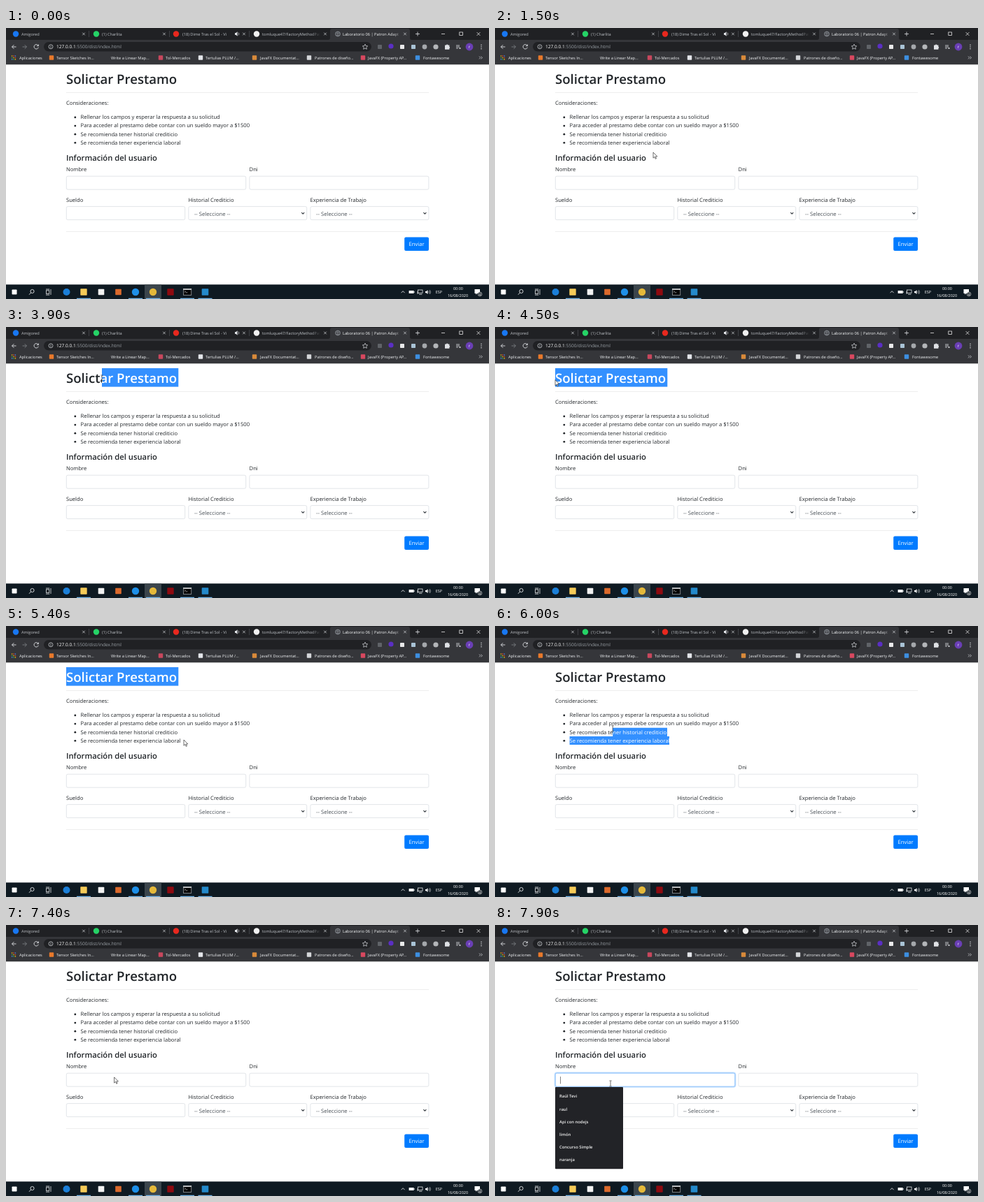
Recreate the animation shown at these times as an HTML page. Size 690 by 388 pixels, loop 8000 ms.

```html
<!DOCTYPE html>
<html lang="es">
<head>
<meta charset="utf-8">
<title>Solicitar préstamo</title>
<style>
  html, body { margin: 0; width: 100%; height: 100%; overflow: hidden; background: #fff; }
  svg { display: block; width: 690px; height: 388px; }
  text { font-family: "Open Sans", "Noto Sans", sans-serif; text-rendering: geometricPrecision; white-space: pre; }
</style>
</head>
<body>
<svg id="stage" viewBox="0 0 690 388" xmlns="http://www.w3.org/2000/svg"></svg>
<script>
const INK = '#212529', BLUE = '#3390ff', STRIP = '#202124', BAR = '#35363a', PALE = '#dfe1e5';

// Markup helpers
const rect = (x, y, w, h, fill, more = '') =>
  `<rect x="${x}" y="${y}" width="${w}" height="${h}" fill="${fill}" ${more}/>`;
const dot = (x, y, r, fill, more = '') => `<circle cx="${x}" cy="${y}" r="${r}" fill="${fill}" ${more}/>`;
const square = (x, y, size, fill) => rect(x - size / 2, y - size / 2, size, size, fill, 'rx=".8"');
const line = (d, color, width = 0.8, more = '') =>
  `<path d="${d}" fill="none" stroke="${color}" stroke-width="${width}" ${more}/>`;
const text = (x, y, size, fill, str, more = '') =>
  `<text x="${x}" y="${y}" font-size="${size}" fill="${fill}" ${more}>${str}</text>`;
const cross = (x, y, r, color) =>
  line(`M${x - r} ${y - r}l${2 * r} ${2 * r}m0 ${-2 * r}l${-2 * r} ${2 * r}`, color, 0.7);

const SEMI = 'font-weight="600"';
const MID = 'text-anchor="middle"';

function tabs() {
  const list = [
    { x: 14, tx: 22, color: '#1877f2', label: 'Amigored', close: 111 },
    { x: 129, tx: 137, color: '#25d366', label: '(1) Charlita', close: 226 },
    { x: 243, tx: 252, color: '#e8281e', label: '(18) Dime Tras el Sol - Vi', fade: 315, end: 326, close: 340 },
    { x: 358, tx: 366, color: '#f1f1f1', label: 'tomluque47/FactoryMethodPatt', fade: 436, end: 449, close: 456 },
    { x: 474, tx: 481, color: '#9aa0a6', label: 'Laboratorio 06 | Patron Adapt', fade: 553, end: 565, close: 570, on: true },
  ];
  let out = rect(0, 0, 690, 17, STRIP) +
    `<path d="M460 17q3 0 3-3V4q0-3 3-3h108q3 0 3 3v10q0 3 3 3z" fill="${BAR}"/>`;
  for (const t of list) {
    const bg = t.on ? 'fadeOn' : 'fadeOff';
    out += t.on
      ? dot(t.x, 8.5, 3.4, 'none', `stroke="${t.color}" stroke-width=".8"`) +
        line(`M${t.x - 3} 7.5h6m-6 2.5h6M${t.x} 5v7`, t.color, 0.6)
      : dot(t.x, 8.5, 4.2, t.color);
    out += text(t.tx, 10.7, 5.7, t.on ? '#f1f3f4' : '#bdc1c6', t.label);
    if (t.fade) {
      out += rect(t.fade, 3, t.end - t.fade, 11, `url(#${bg})`) +
        rect(t.end, 3, t.close - t.end - 3, 11, t.on ? BAR : STRIP);
    }
    out += cross(t.close, 8.5, 1.8, PALE);
  }
  for (const x of [118, 233, 347]) out += rect(x, 4, 0.6, 9, '#55585d');
  out += `<path d="M327 7h1.6l2-1.8v6.6l-2-1.8H327z" fill="${PALE}"/>` +
    line('M332 6.6q1.6 1.9 0 3.8', PALE, 0.7) +
    line('M585 8.5h6m-3-3v6', PALE) +
    line('M622 8.5h5', '#fff', 0.7) +
    rect(647.8, 6, 4.6, 4.6, 'none', 'stroke="#fff" stroke-width=".7"') +
    cross(675, 8.5, 2.4, '#fff');
  return out;
}

function toolbar() {
  let out = rect(0, 17, 690, 35.3, BAR) +
    line('M14.5 27h-6m2.8-2.8L8.5 27l2.8 2.8', PALE, 0.9) +
    line('M23.5 27h6m-2.8-2.8 2.8 2.8-2.8 2.8', '#7b7e83', 0.9) +
    line('M46 25.2a3.2 3.2 0 1 0 .3 2.6M46.4 23.5v2.2h-2.2', PALE, 0.9) +
    rect(54, 20, 468, 13.6, STRIP, 'rx="6.8"') +
    dot(64, 26.8, 3, 'none', `stroke="${PALE}" stroke-width=".7"`) +
    line('M64 26.2v2.3M64 24.9v.7', PALE, 0.7) +
    `<text x="72" y="29.2" font-size="6.55" fill="#9aa0a6"><tspan fill="#fff">127.0.0.1</tspan>:5500/dist/index.html</text>` +
    `<path d="M513 23.2l1.1 2.4 2.6.3-1.9 1.8.5 2.6-2.3-1.3-2.3 1.3.5-2.6-1.9-1.8 2.6-.3z" fill="none" stroke="${PALE}" stroke-width=".7"/>`;
  out += square(534, 27, 6, '#606368') + dot(550, 26, 3.6, '#5b2fc4') +
    square(566, 27, 6, '#e9e9ea') + square(582, 27, 6, '#a9c3d6') +
    dot(598, 27, 3.4, '#a5a8ac') + dot(614, 27, 3.6, '#b4b6b9') +
    `<path d="M627 24.6h2a1.2 1.2 0 0 1 2.4 0h2v2.2a1.2 1.2 0 0 1 0 2.2v1.8H627z" fill="${PALE}"/>` +
    line('M643 25h5m-5 2h5m-5 2h3', PALE, 0.8) + dot(648.5, 29, 1.1, PALE) +
    dot(662, 27, 5.4, '#6a3fb5') + text(662, 29, 6, '#fff', 'r', MID);
  for (const y of [24.3, 27, 29.7]) out += dot(679, y, 0.75, PALE);

  const marks = [
    [19, 'Aplicaciones'],
    [72, 'Tensor Sketches In...', '#e8792b', 65],
    [150, 'Write a Linear Map...'],
    [228, 'Tol-Mercados', '#c8475d', 221],
    [285, 'Tertulias PLUM /...', '#e4e6ea', 278],
    [363, 'JavaFX Documentat...', '#d98a3a', 355],
    [441, 'Patrones de diseño...', '#d5d7da', 433],
    [517, 'JavaFX (Property AP...', '#d8485f', 510],
    [596, 'Fontawesome', '#3d8fe0', 588],
  ];
  for (const [x, label, color, ix] of marks) {
    if (color) out += square(ix, 42.5, 6.4, color);
    out += text(x, 44.7, 5.7, '#eef0f2', label);
  }
  const hues = ['#ea4335', '#fbbc05', '#34a853', '#4285f4'];
  for (let i = 0; i < 9; i++) {
    out += square(8.6 + (i % 3) * 2.4, 40.1 + Math.floor(i / 3) * 2.4, 1.6, hues[(i * 3 + 1) % 4]);
  }
  return out + line('M676 40.6l1.8 1.9-1.8 1.9m2.6-3.8 1.8 1.9-1.8 1.9', PALE, 0.7);
}

const TITLE = 'Solictar Prestamo';
const ITEMS = [
  ['Rellenar los campos y esperar la respuesta a su solicitud', 306],
  ['Para acceder al prestamo debe contar con un sueldo mayor a $1500', 349],
  ['Se recomienda tener historial crediticio', 246],
  ['Se recomienda tener experiencia laboral', 249],
];
const LIST_X = 106.6, LIST_Y = 121.6, STEP = 12.13;
const titleText = fill => text(86, 80, 18.6, fill, TITLE, SEMI);
const listText = fill =>
  ITEMS.map(([str], i) => text(LIST_X, 130.3 + i * STEP, 7.62, fill, str)).join('');
const field = (x, y, w) =>
  rect(x + 0.3, y, w - 0.6, 19, '#fff', 'rx="2" stroke="#ced4da" stroke-width=".6"');
const select = (x, w) => field(x, 255.6, w) +
  text(x + 8.4, 268.5, 7.7, '#495057', '-- Seleccione --') +
  line(`M${x + w - 7.8} 264.2l2 2 2-2`, '#343a40', 1.1);

function page() {
  let out = rect(0, 52.3, 690, 315, '#fff') + titleText(INK) +
    rect(86, 92.2, 518, 0.6, '#e3e3e3') +
    text(86, 110, 7.62, INK, 'Consideraciones:') + listText(INK);
  ITEMS.forEach((_, i) => out += dot(98.8, 127.9 + i * STEP, 1.4, INK));
  out += `<g clip-path="url(#titleSel)">${rect(80, 58.8, 175, 27, BLUE)}${titleText('#fff')}</g>` +
    `<g clip-path="url(#listSel)">${rect(100, 120, 260, 52, BLUE)}${listText('#fff')}</g>`;
  const labels = [
    [86, 205, 'Nombre'], [347.6, 205, 'Dni'], [86, 248.6, 'Sueldo'],
    [260.5, 248.6, 'Historial Crediticio'], [434.6, 248.6, 'Experiencia de Trabajo'],
  ];
  out += text(86, 190, 11.25, INK, 'Información del usuario', SEMI);
  for (const [x, y, str] of labels) out += text(x, y, 7.62, INK, str);
  return out + field(86, 212.2, 257) + field(347.6, 212.2, 256.6) +
    field(86, 255.6, 170) + select(260.5, 169.5) + select(434.6, 169.6) +
    rect(86, 291, 518, 0.6, '#e3e3e3') +
    rect(569.2, 299.6, 34.8, 19.4, '#007bff', 'rx="2"') +
    text(586.6, 312.1, 7.62, '#fff', 'Enviar', MID);
}

function popups() {
  const names = ['Raúl Tevi', 'raul', 'Api con nodejs', 'limón', 'Concurso Simple', 'naranja'];
  return `<g id="focus">` +
    rect(85.5, 211.4, 258, 20.6, 'none', 'rx="3" stroke="#007bff" stroke-opacity=".25" stroke-width="1.7"') +
    rect(86.3, 212.2, 256.4, 19, '#fff', 'rx="2" stroke="#80bdff" stroke-width=".8"') +
    rect(93, 217, 0.6, 10.4, '#333') + `</g><g id="menu">` +
    rect(86, 232, 97, 117.2, '#222327', 'rx="1"') +
    names.map((n, i) => text(92, 247.4 + i * 18.2, 5.9, '#f1f1f1', n, SEMI)).join('') + `</g>`;
}

function taskbar() {
  let out = rect(0, 367.3, 690, 20.7, '#0f1a22') + rect(198, 367.3, 24, 20.7, '#3b454c') +
    square(12, 378, 7, '#fff') +
    dot(37.5, 377, 2.6, 'none', 'stroke="#fff" stroke-width=".8"') + line('M35.6 379l-2.6 2.8', '#fff') +
    rect(57.4, 375.8, 4.4, 4.6, 'none', 'stroke="#fff" stroke-width=".7"') +
    line('M57 374h5.2M57 382.2h5.2M64 374v8', '#fff', 0.7) +
    dot(86.5, 378, 5, '#1b7fd8') + square(111, 378, 9.4, '#f6cb58') +
    square(136, 378, 8.6, '#f1f1f1') + square(160.5, 378, 8.6, '#dc6a2c') +
    dot(185, 378, 5.2, '#1d8fe8') + dot(210, 378, 5.2, '#e5b93a') +
    square(235, 378, 9.4, '#8e0a10') +
    rect(253.4, 373.6, 11.4, 8.8, '#050505', 'stroke="#c9cccf" stroke-width=".6"') +
    rect(253.4, 373.4, 11.4, 1.5, '#d6d8da') + line('M255.2 376.4l1.3 1.1-1.3 1.1m2 .2h2', '#fff', 0.6) +
    square(284.5, 378, 9.6, '#2489ca');
  for (const x of [111, 185, 210, 259, 284.5]) out += rect(x - 10, 386.8, 20, 1.2, '#76b9ed');
  return out + line('M564.6 379.2l2.5-2.5 2.5 2.5', '#fff') +
    rect(575.6, 376, 7, 4, '#fff') + rect(582.8, 377.1, 0.8, 1.8, '#fff') +
    rect(588.6, 375, 6.4, 4.4, 'none', 'stroke="#fff" stroke-width=".7"') + line('M590 381.4h4.4M588 377v4', '#fff', 0.7) +
    `<path d="M599 377h1.5l2-1.8v5.8l-2-1.8H599z" fill="#fff"/>` +
    line('M604 376.6q1.2 1.5 0 3m1.4-4.4q2.2 2.9 0 5.8', '#fff', 0.6) +
    text(618.5, 380.2, 5.5, '#fff', 'ESP', MID) +
    text(646, 375.4, 5.5, '#fff', '00:00', MID) +
    text(645.5, 385.3, 5.5, '#fff', '16/08/2020', MID) +
    `<path d="M669.5 374h7.5v6h-4l-1.8 1.8V380h-1.7z" fill="#fff"/>` +
    dot(677, 381, 2.9, '#30383e', 'stroke="#fff" stroke-width=".5"') + text(677, 382.7, 4.6, '#fff', '4', MID);
}

const fade = (id, color) => `<linearGradient id="${id}"><stop stop-color="${color}" stop-opacity="0"/>` +
  `<stop offset="1" stop-color="${color}"/></linearGradient>`;
const selRect = (y, h) => `<rect y="${y}" height="${h}" width="0"/>`;

document.getElementById('stage').innerHTML =
  `<defs>${fade('fadeOn', BAR)}${fade('fadeOff', STRIP)}` +
  `<clipPath id="titleSel">${selRect(58.8, 27)}</clipPath>` +
  `<clipPath id="listSel">${ITEMS.map((_, i) => selRect(LIST_Y + i * STEP, STEP)).join('')}</clipPath></defs>` +
  page() + tabs() + toolbar() + popups() + taskbar() +
  `<path id="arrow" d="M0 0v8.2l1.9-1.8 1.3 3 1.3-.6-1.3-2.8h2.6z" fill="#fff" stroke="#111" stroke-width=".6"/>` +
  `<path id="beam" d="M-1.6-4h1.2L0-3.7.4-4h1.2M0-3.7v7.4M-1.6 4h1.2L0 3.7.4 4h1.2" fill="none" stroke="#333" stroke-width=".7"/>`;

// Pointer path: time, x, y
const PATH = [
  [600, 330, 392], [1000, 246, 236], [1400, 226, 178], [1900, 226, 178], [2500, 258, 132],
  [3000, 267, 114], [3200, 267, 114], [3500, 246, 74], [3900, 137, 73], [4200, 86, 74],
  [4600, 86, 76], [5300, 254, 163], [5500, 254, 163], [5700, 220, 161], [6200, 140, 139],
  [6600, 87, 129], [6900, 87, 129], [7500, 160, 225], [7800, 165, 227],
];
const LOOP = 8000, TICK = 100;
const TITLE_DRAG = [3500, 4200], TITLE_CLEAR = 5500;
const LIST_DRAG = [5500, 6600], LIST_CLEAR = 7200;
const FOCUS = 7500, MENU = 7600;

const clamp = (v, lo, hi) => Math.min(hi, Math.max(lo, v));
const within = (t, [a, b]) => t >= a && t < b;
const $ = id => document.getElementById(id);
const [titleClip] = $('titleSel').children;
const listClips = [...$('listSel').children];

function pointer(t) {
  const i = PATH.findIndex(p => p[0] > t);
  if (i < 0) return PATH[PATH.length - 1].slice(1);
  if (i === 0) return PATH[0].slice(1);
  const [t0, x0, y0] = PATH[i - 1], [t1, x1, y1] = PATH[i];
  const k = (t - t0) / (t1 - t0), e = k * k * (3 - 2 * k);
  return [x0 + (x1 - x0) * e, y0 + (y1 - y0) * e];
}

function span(clip, from, to) {
  clip.setAttribute('x', from);
  clip.setAttribute('width', Math.max(0, to - from));
}

const show = (id, on) => $(id).setAttribute('visibility', on ? 'visible' : 'hidden');

function draw(t) {
  const [x, y] = pointer(t);
  const beam = within(t, TITLE_DRAG) || within(t, LIST_DRAG) && t > LIST_DRAG[0] || t >= FOCUS;
  for (const id of ['arrow', 'beam']) $(id).setAttribute('transform', `translate(${x} ${y})`);
  show('arrow', t >= PATH[0][0] && !beam);
  show('beam', beam);

  const titleOn = within(t, [TITLE_DRAG[0], TITLE_CLEAR]);
  const titleFrom = t < TITLE_DRAG[1] ? clamp(x, 86, 246.3) : 86;
  span(titleClip, titleOn ? titleFrom : 246.3, 246.3);

  // The selection runs from the pointer to the end of the last item
  const listOn = within(t, [LIST_DRAG[0], LIST_CLEAR]);
  const [px, py] = pointer(Math.min(t, LIST_DRAG[1]));
  const row = clamp(Math.floor((py - LIST_Y) / STEP), 0, 3);
  ITEMS.forEach(([, end], i) => {
    const from = i > row ? LIST_X : i === row ? clamp(px, LIST_X, end) : end;
    span(listClips[i], listOn ? from : end, end);
  });

  show('focus', t >= FOCUS);
  show('menu', t >= MENU);
}

const start = performance.now();
function frame() {
  const t = (performance.now() - start) % LOOP;
  draw(Math.floor(t / TICK) * TICK);
  requestAnimationFrame(frame);
}
frame();
</script>
</body>
</html>
```
